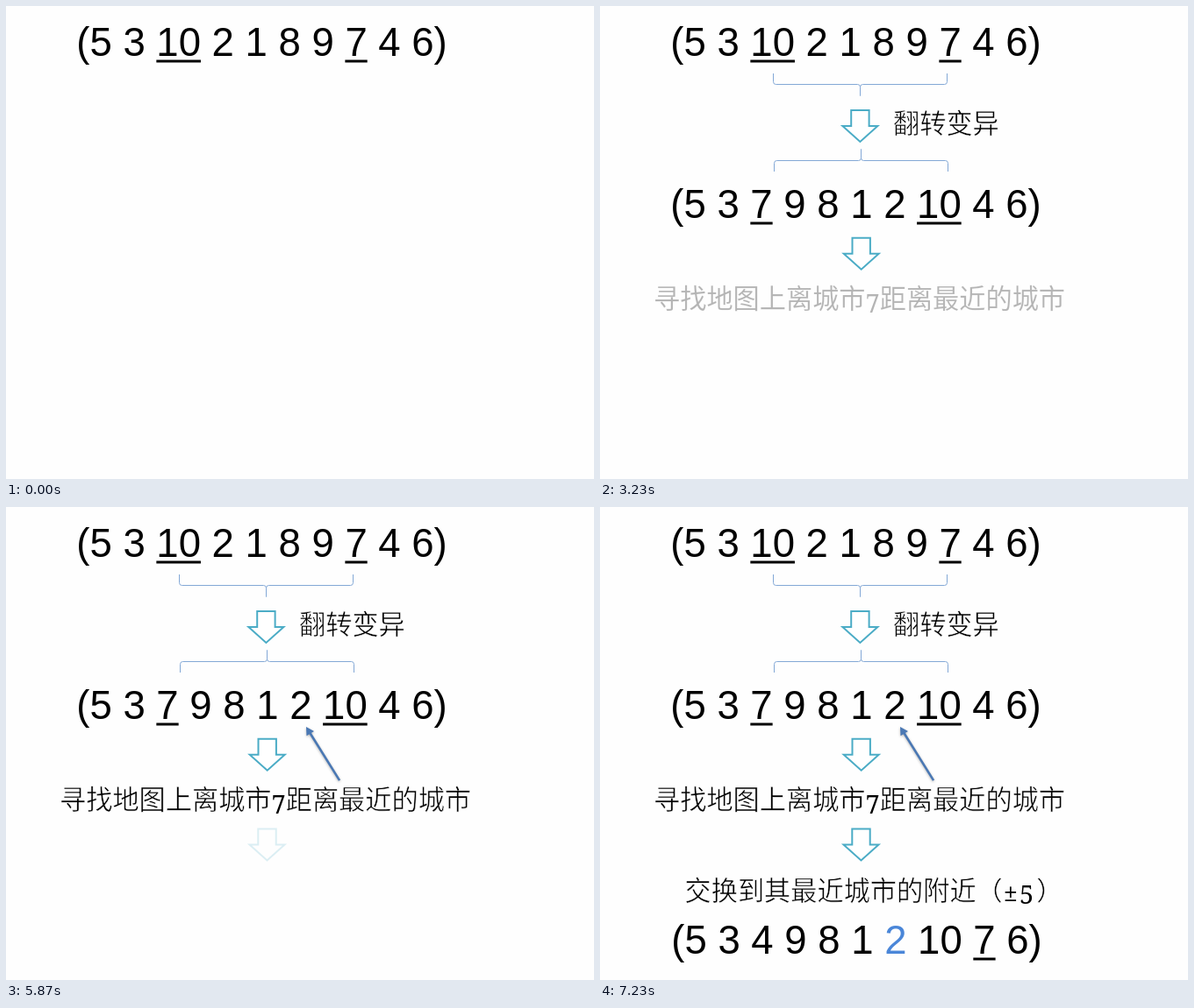
These frames come from a looping animation (670x540 px, 8000 ms). An HTML page with a canvas:

```html
<!DOCTYPE html>
<html lang="zh">
<head>
<meta charset="utf-8">
<title>翻转变异</title>
<style>
  html, body { margin: 0; width: 100%; height: 100%; overflow: hidden; background: #fefefe; }
  canvas { display: block; }
</style>
</head>
<body>
<canvas id="stage" width="670" height="540"></canvas>
<script>
const ctx = document.getElementById('stage').getContext('2d');
const LOOP = 8000, FADE = 480, TICK = 137, PHASE = 69;
const FLY_START = 4160, FLY_TIME = 500;
const PAPER = '#fefefe', BLUE = '#4a78b4', TEAL = '#4bacc6';
const SANS = '45.5px "Liberation Sans", Arial, sans-serif';
const HAN = '300 30.2px "Noto Sans CJK SC", "Noto Sans CJK", sans-serif';
const SERIF = '29px "Noto Serif", "Liberation Serif", serif';

function write(text, x, y, font, color = '#000') {
  ctx.font = font;
  ctx.fillStyle = color;
  ctx.fillText(text, x, y);
  return x + ctx.measureText(text).width;
}

// A paper-coloured outline thins the strokes.
function writeThin(text, x, y) {
  const end = write(text, x, y, HAN);
  ctx.strokeStyle = PAPER;
  ctx.lineWidth = 0.6;
  ctx.strokeText(text, x, y);
  return end;
}

// _n_ is underlined, *n* is blue.
function tour(text, x, y) {
  for (const part of text.split(/(_\d+_|\*\d+\*)/)) {
    const mark = part[0];
    const end = write(part.replace(/[_*]/g, ''), x, y, SANS, mark === '*' ? '#4a86d8' : '#000');
    if (mark === '_') ctx.fillRect(x, y + 4.5, end - x, 3);
    x = end;
  }
}

// dir 1 points down, -1 points up; y is the open end.
function bracket(x, y, dir) {
  const half = 99, mid = x + half, r = 3;
  const bar = y + dir * 12.5, tip = y + dir * 25.5;
  ctx.beginPath();
  for (const side of [-1, 1]) {
    const end = mid + side * half;
    ctx.moveTo(end, y);
    ctx.arcTo(end, bar, mid, bar, r);
    ctx.arcTo(mid, bar, mid, tip, r);
    ctx.lineTo(mid, tip);
  }
  ctx.strokeStyle = '#83a8d6';
  ctx.lineWidth = 1;
  ctx.stroke();
}

function blockArrow(x, y) {
  const shaft = 10.2, head = 20, neck = 18, tip = 36;
  ctx.beginPath();
  ctx.moveTo(x - shaft, y);
  ctx.lineTo(x + shaft, y);
  ctx.lineTo(x + shaft, y + neck);
  ctx.lineTo(x + head, y + neck);
  ctx.lineTo(x, y + tip);
  ctx.lineTo(x - head, y + neck);
  ctx.lineTo(x - shaft, y + neck);
  ctx.closePath();
  ctx.fillStyle = '#fff';
  ctx.fill();
  ctx.strokeStyle = TEAL;
  ctx.lineWidth = 2;
  ctx.stroke();
}

function pointer(y) {
  ctx.save();
  ctx.translate(342, y);
  ctx.rotate(Math.atan2(61, 38));
  ctx.shadowColor = 'rgba(0,0,0,.3)';
  ctx.shadowBlur = 3;
  ctx.shadowOffsetY = 1;
  ctx.fillStyle = BLUE;
  ctx.beginPath();
  ctx.moveTo(0, 0);
  ctx.lineTo(9, -5);
  ctx.lineTo(9, 5);
  ctx.closePath();
  ctx.rect(8, -1.3, 64, 2.6);
  ctx.fill();
  ctx.restore();
}

// Fades parts in: each starts at its own time.
function appear(t, start, paint) {
  if (t <= start) return;
  ctx.globalAlpha = Math.min(1, (t - start) / FADE);
  paint();
  ctx.globalAlpha = 1;
}

function nearestCity() {
  let x = writeThin('寻找地图上离城市', 61, 345);
  x = write('7', x, 350, SERIF);
  writeThin('距离最近的城市', x, 345);
}

function swapNearby() {
  let x = writeThin('交换到其最近城市的附近（', 96.5, 449);
  x = write('±', x + 1, 450, SERIF);
  x = write('5', x + 2, 453, SERIF);
  writeThin('）', x + 3, 449);
}

function draw(t) {
  ctx.fillStyle = PAPER;
  ctx.fillRect(0, 0, 670, 540);
  tour('(5 3 _10_ 2 1 8 9 _7_ 4 6)', 80.3, 57);

  appear(t, 380, () => bracket(197.5, 77, 1));
  appear(t, 860, () => {
    blockArrow(296.4, 119);
    writeThin('翻转变异', 334, 145);
  });
  appear(t, 1370, () => tour('(5 3 _7_ 9 8 1 2 _10_ 4 6)', 80.3, 242));
  appear(t, 1590, () => bracket(198.5, 189, -1));

  appear(t, 2590, () => blockArrow(297.7, 264.7));
  appear(t, 3080, nearestCity);

  if (t > FLY_START) {
    const u = Math.min(1, (t - FLY_START) / FLY_TIME);
    pointer(540 - 289 * u * u * (3 - 2 * u));
  }

  appear(t, 5730, () => blockArrow(297.5, 367.5));
  appear(t, 6230, swapNearby);
  appear(t, 6700, () => tour('(5 3 4 9 8 1 *2* 10 _7_ 6)', 81.3, 510));
}

// Time advances in even, visible steps.
function frame() {
  const t = performance.now() % LOOP;
  draw(Math.floor((t - PHASE) / TICK) * TICK + PHASE);
  requestAnimationFrame(frame);
}
frame();
</script>
</body>
</html>
```
